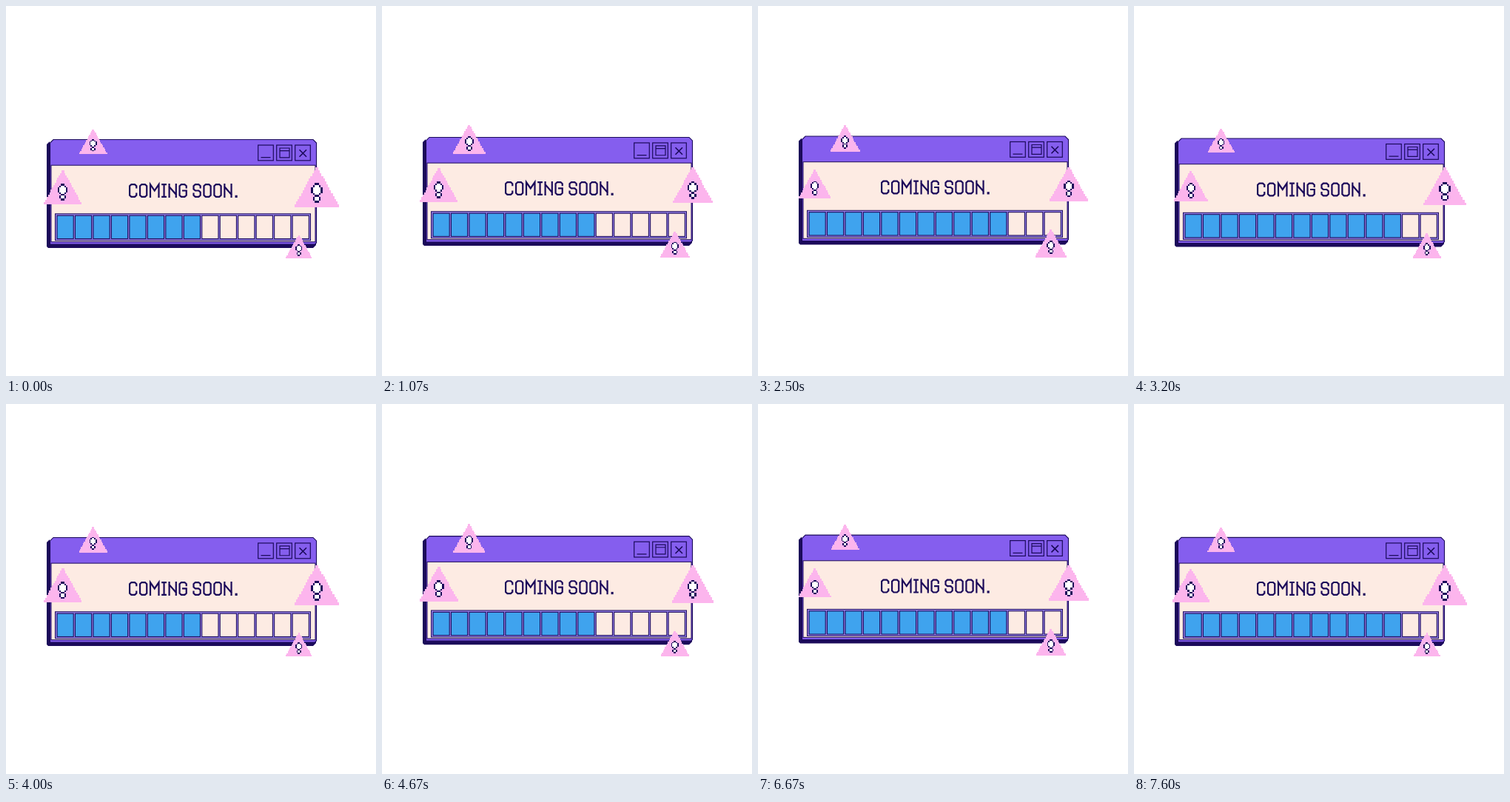
An HTML page that plays this animation: 500 by 500 pixels, repeating every 7660 ms.

```html
<!DOCTYPE html>
<html lang="en">
<head>
<meta charset="utf-8">
<title>Coming soon</title>
<style>
  html, body { margin: 0; width: 100%; height: 100%; overflow: hidden; background: #fff; }
  svg { display: block; width: 100%; height: 100%; }
</style>
</head>
<body>
<svg id="stage" viewBox="0 0 500 500" role="img" aria-label="COMING SOON."></svg>
<script>
const LOOP = 7660, CYCLE = 3880, BAR_LEAD = 154;
const INK = '#1b0a5a', PURPLE = '#855eee', CREAM = '#fdebe3', BLUE = '#3fa3ee', PINK = '#fcb5ed', LILAC = '#9a86ee';
const stage = document.getElementById('stage');

function add(parent, tag, attrs) {
  const node = document.createElementNS('http://www.w3.org/2000/svg', tag);
  for (const name in attrs) node.setAttribute(name, attrs[name]);
  return parent.appendChild(node);
}
const rect = (parent, x, y, width, height, fill, more) =>
  add(parent, 'rect', { x, y, width, height, fill, ...more });
const line = (parent, d, width = 1.2) =>
  add(parent, 'path', { d, fill: 'none', stroke: INK, 'stroke-width': width });
const outline = width => ({ stroke: INK, 'stroke-width': width });

// Window
const panel = add(stage, 'g', {});
add(panel, 'path', { d: 'M59 183L55 187V325L57 327H415L419 323V318H60Z', fill: INK });
add(panel, 'path', {
  d: 'M59.5 322V185L64 180.5H415L419.5 185V320L417.5 322Z',
  fill: PURPLE, ...outline(1.1)
});
rect(panel, 61, 215.2, 357, 103.6, CREAM, outline(1));

// Title bar buttons
for (const x of [340.7, 365.7, 390.7]) rect(panel, x, 188, 20.6, 20.8, 'none', outline(1.2));
line(panel, 'M344.5 204.7H357.5M370 192H383V204.8H370ZM370 195.6H383');
line(panel, 'M396.5 194.3L406 203.8M406 194.3L396.5 203.8', 1.6);

// Progress bar
rect(panel, 66.5, 280.8, 345, 36, LILAC, outline(1));
const cells = Array.from({ length: 14 }, (_, i) =>
  rect(panel, 69 + i * 24.47, 283.2, 22.2, 31.3, CREAM, outline(1.1)));

// Pixel lettering: [width, strokes] on a grid eight rows high
const glyphs = {
  C: [4, 'M4 2V1L3 0H1L0 1V7L1 8H3L4 7V6'],
  O: [4, 'M1 0H3L4 1V7L3 8H1L0 7V1Z'],
  M: [5, 'M0 8V0L2.5 4L5 0V8'],
  I: [2, 'M0 0H2M1 0V8M0 8H2'],
  N: [4, 'M0 8V0M0 1.5L4 6.5M4 8V0'],
  G: [4, 'M4 2V1L3 0H1L0 1V7L1 8H3L4 7V4H2'],
  S: [4, 'M4 2V1L3 0H1L0 1V3L1 4H3L4 5V7L3 8H1L0 7V6'],
  '.': [1, 'M.6 7.5h.4v.5h-.4z']
};
let penX = 167.1;
for (const char of 'COMING SOON.') {
  if (char === ' ') { penX += 5; continue; }
  const [width, d] = glyphs[char];
  add(panel, 'path', {
    d, fill: 'none', ...outline(2.2), 'stroke-linecap': 'square',
    'vector-effect': 'non-scaling-stroke',
    transform: `translate(${penX} 241.1) scale(2.3 2.1)`
  });
  penX += width * 2.3 + 4.75;
}

// Warning signs: centre, mean width, swing, time of greatest width
const mark = ['..##..', '.#oo#.', '#oooo#', '#oooo#', '#oooo#', '.#oo#.', '..##..', '.#oo#.', '.#oo#.', '..##..'];
const signs = [
  { x: 117.7, y: 183.5, size: 40.5, swing: 4.4, peak: 1400 },
  { x: 76.7, y: 245.2, size: 47.6, swing: 4.6, peak: 500 },
  { x: 420, y: 245.1, size: 54.6, swing: 5.6, peak: 0 },
  { x: 395.8, y: 325.4, size: 39.2, swing: 3.9, peak: CYCLE / 2 }
];

// Each sign is one unit wide and 0.9 high, centred on its origin.
function drawSign(sign) {
  sign.node = add(stage, 'g', { 'shape-rendering': 'crispEdges' });
  const rows = 14, step = 0.9 / rows;
  let d = 'M0 -.45';
  for (let i = 1; i <= rows; i++) d += `H${i / 28}v${step}`;
  for (let i = rows; i >= 1; i--) d += `H${-i / 28}v${-step}`;
  add(sign.node, 'path', { d: d + 'Z', fill: PINK });
  const dot = 0.044;
  let dark = '', light = '';
  mark.forEach((row, r) => [...row].forEach((c, i) => {
    const square = `M${(i - 3) * dot} ${-0.095 + r * dot}h${dot}v${dot}h${-dot}z`;
    if (c === '#') dark += square;
    if (c === 'o') light += square;
  }));
  add(sign.node, 'path', { d: dark, fill: INK });
  add(sign.node, 'path', { d: light, fill: '#fff' });
}
signs.forEach(drawSign);

const wave = (t, peak) => Math.cos(2 * Math.PI * (t - peak) / CYCLE);

function render(now) {
  // 12.5 poses per second, aligned to 30 Hz ticks
  const tick = Math.floor((now % LOOP + 4) * 0.03);
  const t = Math.floor(tick * 5 / 12) * 80;
  const lift = -2.75 * (1 - wave(t, 0));
  panel.setAttribute('transform', `translate(0 ${lift})`);

  const filled = 8 + Math.floor((t + BAR_LEAD) % CYCLE / (CYCLE / 5));
  cells.forEach((cell, i) => cell.setAttribute('fill', i < filled ? BLUE : CREAM));

  for (const { node, x, y, size, swing, peak } of signs) {
    const scale = size + swing * wave(t, peak);
    node.setAttribute('transform', `translate(${x} ${y + lift}) scale(${scale})`);
  }
}

const start = performance.now();
function loop() {
  render(performance.now() - start);
  requestAnimationFrame(loop);
}
loop();
</script>
</body>
</html>
```
